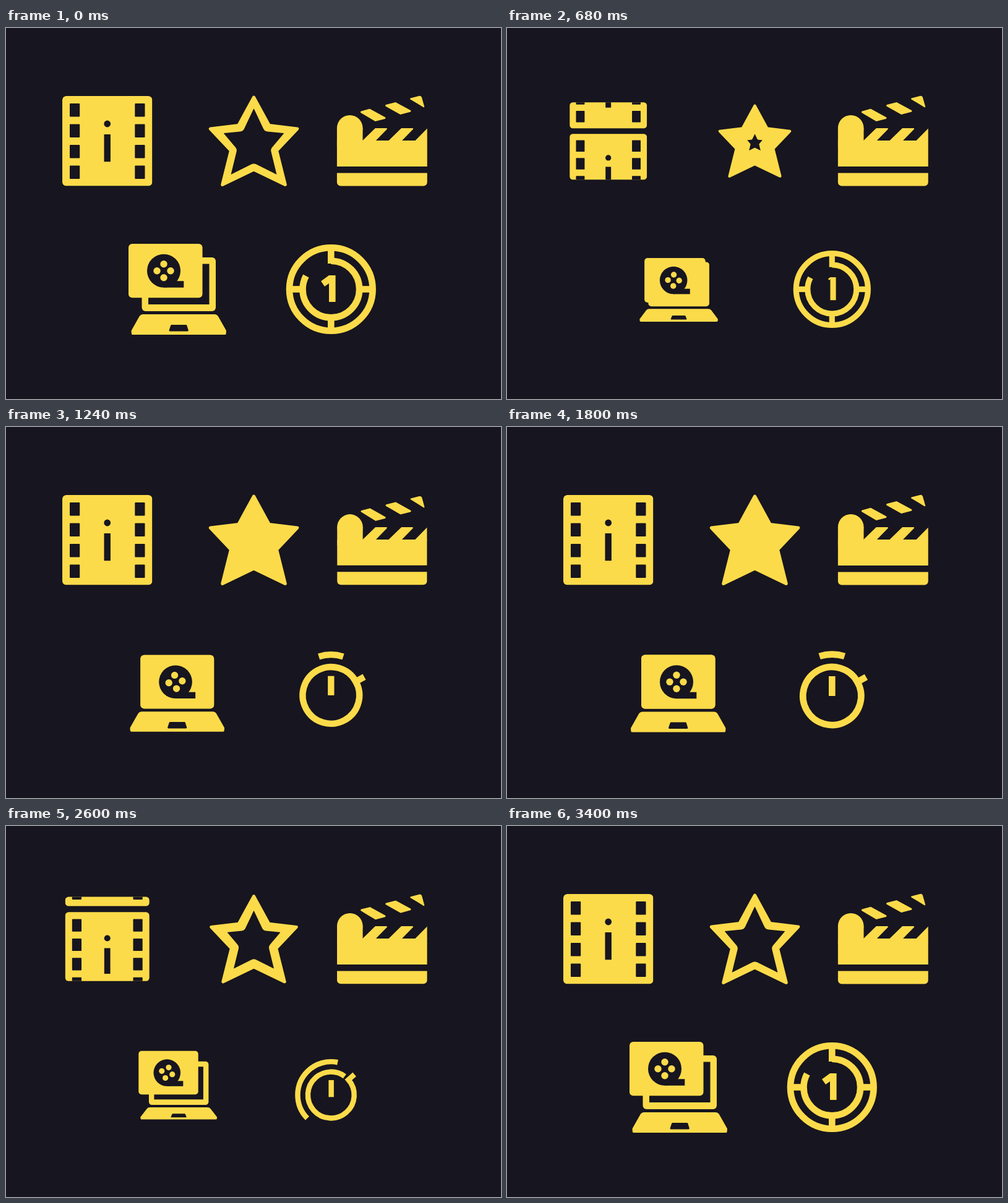
These frames come from a looping animation (800x600 px, 3.44 s). An HTML page with a canvas:

```html
<!DOCTYPE html>
<html lang="en">
<head>
<meta charset="utf-8">
<title>Movie icons</title>
<style>
html, body { margin: 0; width: 100%; height: 100%; overflow: hidden; background: #17151f; }
canvas { display: block; }
</style>
</head>
<body>
<canvas id="stage" width="800" height="600"></canvas>
<script>
const ctx = document.getElementById('stage').getContext('2d');
const DARK = '#17151f', GOLD = '#fcdb4a';
const LOOP = 3440, HALF = 1800;
const rad = deg => deg * Math.PI / 180;
const clamp = x => Math.min(1, Math.max(0, x));
const mix = (a, b, k) => a + (b - a) * k;

// cubic-bezier(.25, .1, .25, 1)
function ease(x) {
  if (x <= 0 || x >= 1) return clamp(x);
  let lo = 0, hi = 1, u;
  for (let i = 0; i < 20; i++) {
    u = (lo + hi) / 2;
    if (.75 * u * (1 - u) + u ** 3 < x) lo = u; else hi = u;
  }
  return .3 * u * (1 - u) ** 2 + 3 * u * u * (1 - u) + u ** 3;
}
const inOut = x => x < .5 ? 4 * x ** 3 : 1 - 4 * (1 - x) ** 3;
const run = (t, start, length) => ease((t - start) / length);
// Rises after a, falls back after b
const pulse = (t, a, aLen, b, bLen) => run(t, a, aLen) - run(t, b, bLen);

function group(draw) { ctx.save(); draw(); ctx.restore(); }
function scaleAt(x, y, sx, sy = sx) {
  ctx.translate(x, y);
  ctx.scale(sx, sy);
  ctx.translate(-x, -y);
}
function rotateAt(x, y, deg) {
  ctx.translate(x, y);
  ctx.rotate(rad(deg));
  ctx.translate(-x, -y);
}
function box(x, y, w, h, r, color) {
  ctx.fillStyle = color;
  ctx.beginPath();
  ctx.roundRect(x, y, w, h, r);
  ctx.fill();
}
function disc(x, y, r, color) {
  ctx.fillStyle = color;
  ctx.beginPath();
  ctx.arc(x, y, r, 0, 7);
  ctx.fill();
}
function poly(pts, color, radius = () => 0) {
  const n = pts.length, last = pts[n - 1];
  ctx.fillStyle = color;
  ctx.beginPath();
  ctx.moveTo((last[0] + pts[0][0]) / 2, (last[1] + pts[0][1]) / 2);
  pts.forEach((p, i) => ctx.arcTo(...p, ...pts[(i + 1) % n], radius(i)));
  ctx.closePath();
  ctx.fill();
}

function filmFrame(dy) {
  group(() => {
    ctx.translate(0, dy);
    box(91, 110, 145.4, 145.4, 6, GOLD);
    for (let i = 0; i < 4; i++)
      for (const x of [103, 208.3]) box(x, 122 + i * 33.5, 16.2, 21.5, 1, DARK);
    disc(163.7, 155, 5.4, DARK);
    box(158.5, 172, 10.4, 44.3, 0, DARK);
  });
}

function film(t) {
  const u = t % HALF, step = 155.8;
  const s = 1 - .2 * pulse(u, 20, 440, 560, 600);
  const scroll = step * run(u, 430, 700);
  group(() => {
    scaleAt(163.7, 182.7, s);
    ctx.beginPath();
    ctx.roundRect(91, 110, 145.4, 145.4, 6);
    ctx.clip();
    filmFrame(-scroll);
    filmFrame(step - scroll);
  });
}

const mirror = right => {
  const left = right.slice(1, -1).reverse().map(([x, y]) => [-x, y]);
  return right.concat(left);
};
const STAR = mirror([[0, 112], [24.9, 157.6], [70.3, 163], [37, 198.2], [50.8, 253.4], [0, 229]]);
const HOLE = mirror([[0, 130], [17.5, 167], [49, 170], [27, 196], [37, 237], [0, 218.5]]);

function star(t) {
  const s = 1 - .2 * (pulse(t, 510, 230, 740, 260) + pulse(t, 2210, 230, 2440, 260));
  const hole = 1 - pulse(t, 600, 200, 2440, 260);
  group(() => {
    scaleAt(400.5, 182.5, s);
    ctx.translate(400.5, 0);
    poly(STAR, GOLD);
    ctx.strokeStyle = GOLD;
    ctx.lineWidth = 5;
    ctx.lineJoin = 'round';
    ctx.stroke();
    if (hole > 0) {
      scaleAt(0, 186, hole);
      poly(HOLE, DARK, i => i % 2 ? 8 : .5);
    }
  });
}

function clapper(t) {
  const u = t % HALF, hit = 960;
  const shut = u < hit ? clamp((u - 540) / 420) ** 8 : clamp(1 - (u - hit) / 740) ** 6;
  group(() => {
    scaleAt(608, 183, 1 - .08 * shut);
    disc(555.7, 161.7, 20.8, GOLD);
    box(534.9, 161.7, 41.6, 30, 0, GOLD);
    box(534.9, 182, 145.8, 42, 0, GOLD);
    box(534.9, 234.5, 145.8, 21, [0, 0, 6, 6], GOLD);
    for (const x of [576.3, 618.5])
      poly([[x, 183], [x, 182], [x + 20.5, 162], [x + 41, 162], [x + 21.5, 182], [x + 21.5, 183]], GOLD, () => 1);
    poly([[660.5, 183], [680.7, 162.5], [680.7, 183]], GOLD);
    rotateAt(555.7, 161.7, 15.6 * shut);
    poly([[570.5, 135.3], [588, 130.7], [616, 146], [597, 151]], GOLD, () => 1.5);
    poly([[610.5, 125], [629.5, 120], [657, 134.7], [637.5, 140]], GOLD, () => 1.5);
    poly([[651.5, 114.2], [671, 109], [676.8, 129.5]], GOLD, i => i === 1 ? 4 : 1);
  });
}

function reel(x, y, turn) {
  disc(x, y, 27, DARK);
  box(x, y + 16.5, 32.3, 10.5, 0, DARK);
  for (let i = 0; i < 4; i++) {
    const a = rad(turn + 90 * i);
    disc(x + 11 * Math.sin(a), y - 11 * Math.cos(a), 5.7, GOLD);
  }
}

function laptop(t) {
  const u = t % HALF;
  const s = 1 - .2 * pulse(u, 540, 240, 770, 600);
  const merge = pulse(t, 560, 320, 2360, 320);
  const turn = 180 * inOut(clamp((u - 540) / 900));
  group(() => {
    ctx.translate(-2.5 * merge, -2.5 * merge);
    scaleAt(279.2, 422.5, s);
    box(219.5, 371, 119.5, 87, 6, GOLD);
    box(230, 381.5, 98.5, 65.5, 0, DARK);
    group(() => {
      ctx.translate(21.5 * merge, 22 * merge);
      box(198, 349, 119.5, 87.3, 6, GOLD);
      reel(255, 392.7, turn);
    });
    scaleAt(279, 463, 1, 1 - 1.38 * (1 - s));
    poly([[217.5, 463], [341, 463], [356, 489.5], [355.5, 496], [203, 496], [202.5, 489.5]],
      GOLD, i => i < 2 ? 7 : 2);
    poly([[266.5, 480], [292, 480], [295.3, 490.5], [263, 490.5]], DARK, () => 1.5);
  });
}

// Angles are clockwise from the top
function ring(r, from, to) {
  ctx.strokeStyle = GOLD;
  ctx.lineWidth = 10.6;
  ctx.beginPath();
  ctx.arc(0, 0, r, rad(from - 90), rad(to - 90));
  ctx.stroke();
}

function timer(t) {
  const s = 1 - .2 * (pulse(t, 560, 300, 900, 580) + pulse(t, 2340, 260, 2600, 460));
  const drop = pulse(t, 880, 560, 2700, 550);
  const cap = pulse(t, 740, 450, 2460, 640);
  const spin = pulse(t, 850, 400, 2500, 640);
  const flag = 1 - pulse(t, 600, 200, 2700, 180);
  group(() => {
    ctx.translate(525.3, 422.5 + 12.5 * drop);
    ctx.scale(s, s);
    ring(67.3, 342.5 * cap, 360 + 17.5 * cap);
    group(() => {
      ctx.rotate(rad(61 * spin));
      ring(mix(45.8, 47, spin), 0, mix(298, 360, spin));
      for (let i = 0; i < 4; i++) {
        const top = i ? mix(63, 48, spin) : 63, foot = i ? 47 : 41.5;
        if (top > foot) box(-5.3, -top, 10.6, top - foot, 0, GOLD);
        ctx.rotate(Math.PI / 2);
      }
    });
    const x = mix(-3.3, -5.3, spin), y = mix(-22.5, -32, spin);
    box(x, y, 10.6, mix(43, 32, spin), 0, GOLD);
    if (flag > 0)
      poly([[x + 1, y], [x, y], [x - 13 * flag, y + 9.5 * flag], [x - 7 * flag, y + 18 * flag],
        [x, y + 13 * flag], [x + 1, y + 13 * flag]], GOLD);
  });
}

function draw(t) {
  ctx.fillStyle = DARK;
  ctx.fillRect(0, 0, 800, 600);
  for (const icon of [film, star, clapper, laptop, timer]) icon(t);
}

const begin = performance.now();
function tick() {
  draw((performance.now() - begin) % LOOP);
  requestAnimationFrame(tick);
}
tick();
</script>
</body>
</html>
```
